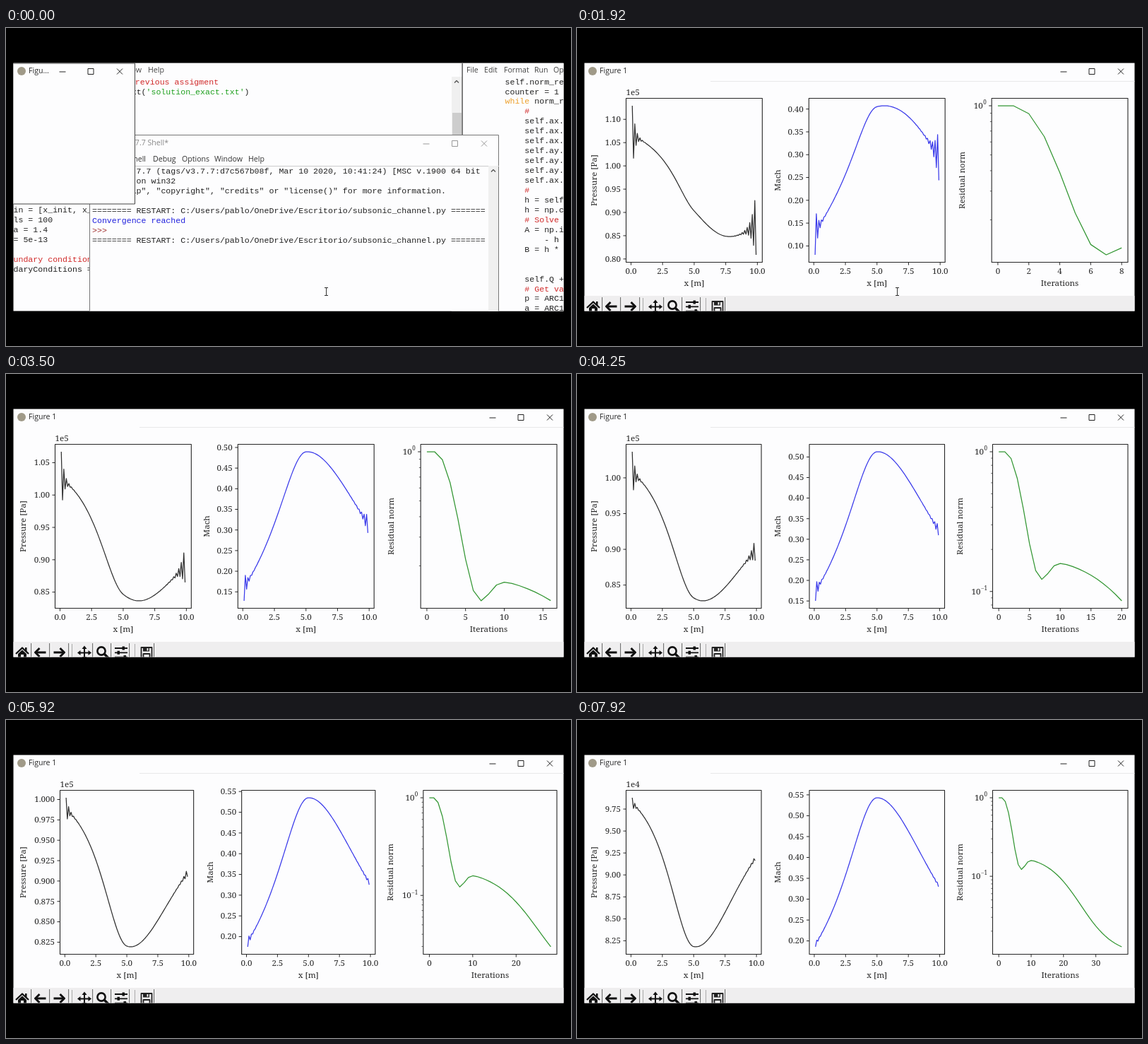
Recreate the animation shown at these times as an HTML page with a canvas. Size 800 px wide and 450 px high, loop 8 s.

```html
<!DOCTYPE html>
<html lang="en">
<head>
<meta charset="utf-8">
<title>Solver convergence</title>
<style>
  html, body { margin: 0; width: 100%; height: 100%; overflow: hidden; background: #000; }
  canvas { display: block; width: 800px; height: 450px; }
</style>
</head>
<body>
<canvas id="stage" width="800" height="450"></canvas>
<script>
const ctx = document.getElementById('stage').getContext('2d');
const LOOP = 8000, OPENED = 330, FIRST_PLOT = 420, ITERATION = 200, POINTER_GONE = 2830;
const TOP = 99.5, BOTTOM = 331.5, RIGHT = 780;
const SERIF = '11.6px "Noto Serif", serif';
const SMALL = '8px "Noto Serif", serif';
const MONO = '11.6px "Liberation Mono", monospace';
const UI = '10.6px "Open Sans", sans-serif';
const INK = '#262626', PAPER = '#fdfdfe', RED = '#d02a2a';

// ---- Flow model: steady isentropic nozzle plus a decaying transient ----

const cells = Array.from({ length: 99 }, (_, i) => (i + 1) / 10);
const bell = (x, centre, width) => Math.exp(-(((x - centre) / width) ** 2));
const pulse = (k, peak, power) => (k / peak * Math.exp(1 - k / peak)) ** power;
const mix = (a, b, f) => a + (b - a) * f;

function steadyMach(x) {
  const area = 1 + (x < 5 ? 1.5 : .5) * (1 - x / 5) ** 2;
  let lo = .01, hi = 1;
  for (let i = 0; i < 40; i++) {
    const m = (lo + hi) / 2;
    if (((1 + .2 * m * m) / 1.2) ** 3 / m > area / .8) lo = m; else hi = m;
  }
  return lo;
}

const MACH = cells.map(steadyMach);
const PRESSURE = MACH.map(m => (1 + .2 * m * m) ** -3.5);

// Odd-even ripple that fades away from both boundaries
function ripple(i, left, right) {
  const wave = (size, ratio, n) => size * (-ratio) ** n * (n ? 1.2 : 1);
  return wave(left, .6, i) + wave(right, .72, cells.length - 1 - i);
}

function pressureAt(k) {
  const inlet = .006 + .082 * pulse(k, 7.5, 1.7);
  const outlet = -.07 * Math.exp(-((k / 21) ** 1.4));
  const hump = .005 + .215 * Math.exp(-.14 * k);
  const left = .003 + .062 * pulse(k, 7.5, 1.2), right = -.002 - .066 * pulse(k, 6, 1.5);
  return cells.map((x, i) => [x, PRESSURE[i] + mix(inlet, outlet, (1 - Math.cos(Math.PI * x / 10)) / 2)
    + hump * bell(x, 4.7, 2.5) + ripple(i, left, right)]);
}

function machAt(k) {
  const inlet = .055 * pulse(k, 7.5, 1.7);
  const hump = .008 + .285 * Math.exp(-.135 * k);
  const left = -.004 - .046 * pulse(k, 7.5, 1.2), right = -.003 - .052 * pulse(k, 6, 1.5);
  return cells.map((x, i) => [x, MACH[i] - inlet * (1 - .04 * x)
    - hump * bell(x, 4.8, 3) + ripple(i, left, right)]);
}

// log10 of the residual: a damped swing followed by a slow fall
function residual(k) {
  if (k < 2) return 0;
  const fall = -.73 - 1.27 / (1 + Math.exp((25.3 - k) / 5.2));
  return fall + .742 * Math.cos(.353 * (k - 1)) * Math.exp(-(((k - 1) / 6.05) ** 4));
}

// ---- Drawing helpers ----

function text(s, x, y, font, color = INK, align = 'left') {
  ctx.font = font;
  ctx.fillStyle = color;
  ctx.textAlign = align;
  ctx.textBaseline = 'middle';
  ctx.fillText(s, x, y);
}

const code = (s, x, y, color = '#222') => text(s, x, y, MONO, color);

function box(x, y, w, h, color) {
  ctx.fillStyle = color;
  ctx.fillRect(x, y, w, h);
}

function stroke(points, color = INK, width = 1) {
  ctx.beginPath();
  points.forEach(([x, y]) => ctx.lineTo(x, y));
  ctx.strokeStyle = color;
  ctx.lineWidth = width;
  ctx.lineJoin = 'round';
  ctx.stroke();
}

function fillShape(points) {
  ctx.fillStyle = '#111';
  ctx.beginPath();
  points.forEach(([x, y]) => ctx.lineTo(x, y));
  ctx.fill();
}

function turned(x, y, angle, paint) {
  ctx.save();
  ctx.translate(x, y);
  ctx.rotate(angle);
  paint();
  ctx.restore();
}

// ---- Plots ----

function limits(points) {
  const values = points.map(p => p[1]);
  const lo = Math.min(...values), hi = Math.max(...values), pad = (hi - lo) * .05;
  return [lo - pad, hi + pad];
}

function ticks([lo, hi], maxBins) {
  const raw = (hi - lo) / maxBins, unit = 10 ** Math.floor(Math.log10(raw));
  const step = unit * [1, 2, 2.5, 5, 10].find(s => s * unit >= raw - 1e-9);
  const list = [];
  for (let i = Math.ceil(lo / step); i * step <= hi; i++) list.push(i * step);
  return { step, list };
}

function decimals(step) {
  let d = 0;
  while (d < 4 && Math.abs(step * 10 ** d - Math.round(step * 10 ** d)) > 1e-6) d++;
  return d;
}

const sideLabel = (s, x) => turned(x, 215.5, -Math.PI / 2, () => text(s, 0, 0, SERIF, INK, 'center'));

function powerLabel(base, exponent, right, y) {
  const sup = String(exponent).replace('-', '−');
  text(sup, right, y - 4, SMALL, INK, 'right');
  text(base, right - ctx.measureText(sup).width - .5, y + .5, SERIF, INK, 'right');
}

function plot({ left, width, points, xLim, yLim, xTicks, xDigits, xName, color }) {
  const px = x => left + (x - xLim[0]) / (xLim[1] - xLim[0]) * width;
  const py = y => BOTTOM - (y - yLim[0]) / (yLim[1] - yLim[0]) * (BOTTOM - TOP);
  stroke(points.map(([x, y]) => [px(x), py(y)]), color, 1.25);
  ctx.lineWidth = 1.1;
  ctx.strokeStyle = INK;
  ctx.strokeRect(left, TOP, width, BOTTOM - TOP);
  for (const x of xTicks) {
    stroke([[px(x), BOTTOM], [px(x), BOTTOM + 4]]);
    text(x.toFixed(xDigits), px(x), 345, SERIF, INK, 'center');
  }
  text(xName, left + width / 2, 361.5, SERIF, INK, 'center');
  return py;
}

function yTicks(left, py, list, format) {
  for (const y of list) {
    stroke([[left - 4, py(y)], [left, py(y)]]);
    text(format(y), left - 7.5, py(y) + .5, SERIF, INK, 'right');
  }
}

function logTicks(left, py, [lo, hi]) {
  const span = hi - lo;
  const labelled = d => span <= .4 || (span <= 1 && [2, 3, 4, 6].includes(d));
  for (let e = Math.floor(lo); e <= hi; e++) {
    for (let d = 1; d < 10; d++) {
      const v = e + Math.log10(d), major = d === 1;
      if (v < lo || v > hi) continue;
      stroke([[left - (major ? 4 : 2.3), py(v)], [left, py(v)]], INK, major ? 1 : .7);
      if (major) powerLabel('10', e, left - 7.5, py(v));
      else if (labelled(d)) powerLabel(d + ' × 10', e, left - 7.5, py(v));
    }
  }
}

function drawPlots(k) {
  const pressure = pressureAt(k), mach = machAt(k);
  const norm = Array.from({ length: k + 1 }, (_, i) => [i, residual(i)]);
  const pLim = limits(pressure), mLim = limits(mach), nLim = k === 1 ? [-1.1, 1.1] : limits(norm);
  const pTicks = ticks(pLim, 9), mTicks = ticks(mLim, 9);
  const large = pTicks.list.at(-1) >= 1 - 1e-9, scale = large ? 1 : 10;
  const pDigits = decimals(pTicks.step * scale);

  // label widths decide how much room the axes get
  const minor = nLim[1] - nLim[0] <= 1, decade = nLim[0] <= -1;
  const left = pDigits > 2 ? 76.5 : 69.5;
  const gap = minor ? 86 : decade ? 68 : 66;
  const width = (RIGHT - left - 2 * gap) / 3;
  const second = left + width + gap, third = second + width + gap;
  const space = { width, xLim: [-.39, 10.39], xTicks: [0, 2.5, 5, 7.5, 10], xDigits: 1, xName: 'x [m]' };

  let py = plot({ ...space, left, points: pressure, yLim: pLim, color: '#303030' });
  yTicks(left, py, pTicks.list, v => (v * scale).toFixed(pDigits));
  text(large ? '1e5' : '1e4', left, 91.5, SERIF);
  sideLabel('Pressure [Pa]', 25);

  py = plot({ ...space, left: second, points: mach, yLim: mLim, color: '#3a3aea' });
  yTicks(second, py, mTicks.list, v => v.toFixed(Math.max(2, decimals(mTicks.step))));
  sideLabel('Mach', second - 44);

  const xLim = [-.05 * k, 1.05 * k], count = ticks(xLim, 5);
  py = plot({ left: third, width, points: norm, xLim, yLim: nLim, xTicks: count.list,
    xDigits: count.step < 1 ? 1 : 0, xName: 'Iterations', color: '#339633' });
  logTicks(third, py, nLim);
  sideLabel('Residual norm', third - (minor ? 64 : decade ? 46 : 41));
}

// ---- Windows ----

function windowButtons([a, b, c], y, color = '#222') {
  stroke([[a - 4.5, y + .5], [a + 4.5, y + .5]], color);
  ctx.strokeRect(b - 4, y - 4, 8, 8);
  stroke([[c - 4, y - 4], [c + 4, y + 4]], color);
  stroke([[c + 4, y - 4], [c - 4, y + 4]], color);
}

function figureTitle(s, buttons) {
  ctx.fillStyle = '#a09a88';
  ctx.beginPath();
  ctx.arc(22, 61, 6, 0, 7);
  ctx.fill();
  text(s, 32, 61.5, UI);
  windowButtons(buttons, 61.5);
}

function arrow(x, y, angle) {
  turned(x, y, angle, () => {
    stroke([[-7.5, 0], [6.5, 0]], '#111', 3);
    stroke([[1.5, -6], [7.5, 0], [1.5, 6]], '#111', 3);
  });
}

function toolbar() {
  box(10, 379, 780, 22, '#efeeef');
  for (const x of [36, 62, 89, 123, 149, 175, 210]) {
    box(x - 1, 381, 1.5, 20, '#777');
    box(x + .5, 381, 1, 20, '#fff');
  }
  for (const x of [93, 182]) box(x, 382, 1, 19, '#aaa');
  // home
  stroke([[14, 396], [23, 387.5], [32, 396]], '#111', 2.4);
  fillShape([[17, 396], [23, 390.5], [29, 396], [29, 402], [25, 402], [25, 397], [21, 397], [21, 402], [17, 402]]);
  box(27, 387, 2.5, 5, '#111');
  arrow(49, 394, Math.PI);
  arrow(75, 394, 0);
  // pan
  for (let i = 0; i < 4; i++) {
    turned(111, 394.5, i * Math.PI / 2, () => {
      stroke([[0, 0], [7, 0]], '#111', 2);
      fillShape([[10, 0], [5.5, -3.5], [5.5, 3.5]]);
    });
  }
  // zoom
  ctx.lineWidth = 2.6;
  ctx.beginPath();
  ctx.arc(135, 392, 5.6, 0, 7);
  ctx.stroke();
  stroke([[139, 396], [145, 402]], '#111', 3.4);
  // sliders
  [166, 159, 168].forEach((x, i) => {
    const y = 388 + 6.3 * i;
    stroke([[154, y], [172, y]], '#111', 1.8);
    box(x - 1.5, y - 2.5, 3.5, 5, '#111');
  });
  // save
  ctx.lineWidth = 1.8;
  ctx.strokeStyle = '#222';
  ctx.strokeRect(191.5, 387, 15, 18);
  box(194, 387, 9, 5.5, '#222');
  box(199.5, 388, 2, 3.5, '#eee');
  ctx.strokeRect(194.5, 396, 9, 8);
}

function figureWindow(k) {
  box(10, 49, 780, 352, PAPER);
  box(189, 75, 601, 1, '#e8e8ea');
  figureTitle('Figure 1', [689, 729, 770]);
  toolbar();
  if (k > 0) drawPlots(k);
}

const scrollArrow = (x, y) => stroke([[x - 3, y + 1.5], [x, y - 1.5], [x + 3, y + 1.5]], '#555', 1.4);

function leftEditor() {
  text('Window', 152, 60, UI, '#444');
  text('Help', 201, 60, UI, '#444');
  code('# previous assigment', 162, 76.5, RED);
  code('xt(', 177.7, 90.5);
  code("'solution_exact.txt'", 198.5, 90.5, '#1fa01f');
  code(')', 337.5, 90.5);
  box(631, 69, 15, 332, '#f0f0f0');
  scrollArrow(638, 76);
  box(632, 120, 13, 32, '#cdcdcd');
  ['in = [x_init, x_', 'ls = 100', 'a = 1.4', '= 5e-13'].forEach((s, i) => code(s, 10.5, 257.5 + 14 * i));
  code('undary condition', 10.5, 327.5, RED);
  code('daryConditions =', 10.5, 341.5);
}

function rightEditor() {
  box(646, 50, 144, 351, PAPER);
  box(645.5, 50, 1.2, 101, '#333');
  [['File', 652], ['Edit', 677], ['Format', 705], ['Run', 748], ['Options', 775]]
    .forEach(([s, x]) => text(s, x, 60, UI, '#444'));
  const ax = '    self.ax.', ay = '    self.ay.';
  ['self.norm_re', 'counter = 1', '      norm_r', '    #', ax, ax, ax, ay, ay, ay, ax, '    #',
    '    h = self', '    h = np.c', '    # Solve ', '    A = np.i', '        - h ', '    B = h * ', '', '',
    '    self.Q +', '    # Get va', '    p = ARC1', '    a = ARC1']
    .forEach((s, i) => code(s, 706.5, 76.5 + 13.95 * i, s.includes('#') ? RED : '#222'));
  code('while', 706.5, 104.4, '#eda02c');
}

function shell() {
  box(118, 151, 580, 250, PAPER);
  ctx.lineWidth = 1;
  ctx.strokeStyle = '#777';
  ctx.strokeRect(118.5, 151.5, 579, 260);
  text('Python 3.7.7 Shell*', 230, 163.5, UI, '#888', 'right');
  windowButtons([595, 635.5, 677], 163.5, '#999');
  text('Shell', 198, 186, UI, '#333', 'right');
  [['Debug', 208], ['Options', 249], ['Window', 295], ['Help', 343]]
    .forEach(([s, x]) => text(s, x, 186, UI, '#333'));
  box(118, 195, 580, 1, '#ccc');
  box(683, 195, 14, 206, '#f0f0f0');
  scrollArrow(690, 202);
  const restart = '======== RESTART: C:/Users/pablo/OneDrive/Escritorio/subsonic_channel.py =======';
  const colors = { 'Convergence reached': '#2222dd', '>>>': '#a03030' };
  ['Python 3.7.7 (tags/v3.7.7:d7c567b08f, Mar 10 2020, 10:41:24) [MSC v.1900 64 bit',
    '(AMD64)] on win32',
    'Type "help", "copyright", "credits" or "license()" for more information.',
    '', restart, 'Convergence reached', '>>>', restart]
    .forEach((s, i) => code(s, 122, 202.5 + 14 * i, colors[s]));
}

function desktop() {
  box(10, 49, 780, 352, PAPER);
  leftEditor();
  rightEditor();
  shell();
  box(10, 50, 172, 199, PAPER);
  stroke([[10, 50], [182.5, 50], [182.5, 249], [10, 249]], '#444');
  figureTitle('Figu...', [80, 120, 161]);
}

function pointer() {
  for (const y of [367.5, 378.5]) stroke([[451, y], [456, y]], '#333');
  stroke([[453.5, 367], [453.5, 379]], '#333');
}

function draw(now) {
  const t = now % LOOP;
  box(0, 0, 800, 450, '#000');
  ctx.save();
  ctx.beginPath();
  ctx.rect(10.5, 49.5, 779, 351);
  ctx.clip();
  if (t < OPENED) desktop();
  else figureWindow(Math.floor((t - FIRST_PLOT) / ITERATION) + 1);
  if (t < POINTER_GONE) pointer();
  ctx.restore();
  requestAnimationFrame(draw);
}
draw(performance.now());
</script>
</body>
</html>
```
